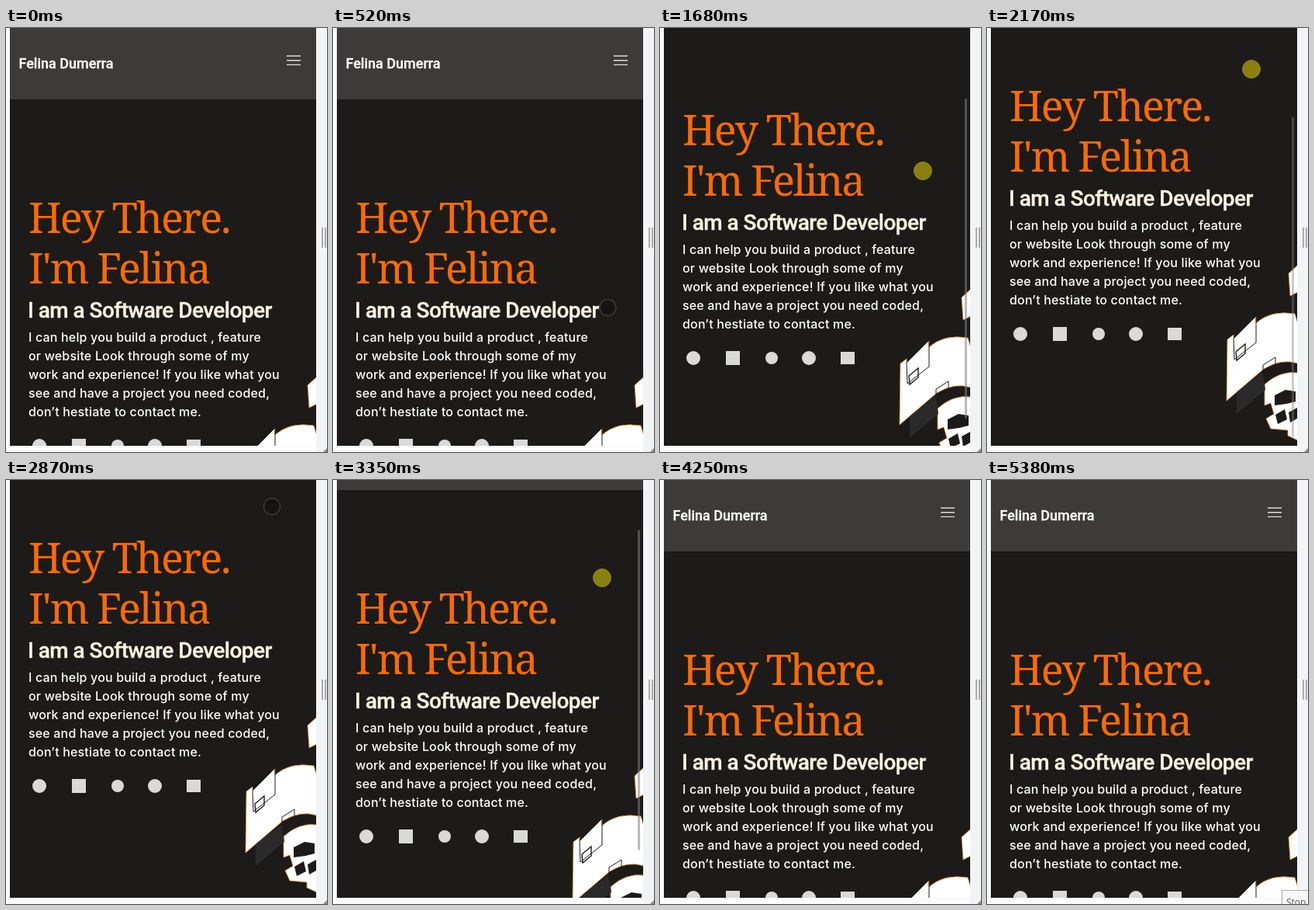
Recreate the animation shown at these times as an HTML page. Size 414x546 px, loop 5.45 s.

```html
<!DOCTYPE html>
<html lang="en">
<head>
<meta charset="utf-8">
<title>Portfolio scroll</title>
<style>
  html, body { margin: 0; width: 100%; height: 100%; overflow: hidden; background: #fbfcfd; }
  svg { display: block; width: 414px; height: 546px; }
  .brand, .role { font-family: Roboto, sans-serif; font-weight: 500; }
  .brand { font-size: 18px; fill: #fff; stroke: #fff; stroke-width: .3; }
  .role { font-size: 28px; letter-spacing: -.56px; fill: #fdf3e1; stroke: #fdf3e1; stroke-width: .4; }
  .title { font: 500 54px "Noto Serif", serif; letter-spacing: -2.1px; fill: #ff6a00; }
  .copy { font: 500 16px Inter, sans-serif; letter-spacing: .17px; fill: #fff; }
  .tip text { font: 12px "Open Sans", sans-serif; fill: #575757; }
</style>
</head>
<body>
<svg viewBox="0 0 414 546">
  <defs>
    <clipPath id="view"><rect x="5" width="395" height="538"/></clipPath>
  </defs>
  <rect x="400" width="14" height="546" fill="#f1f3f5"/>
  <path d="M408 257v26M412 257v26" stroke="#9a9a9a" stroke-width="1.6"/>
  <path d="M414 541v5h-5z" fill="#8c8c8c"/>

  <g clip-path="url(#view)">
    <rect x="5" width="395" height="538" fill="#1c1b19"/>
    <g id="page">
      <rect x="5" width="395" height="92" fill="#3c3b39"/>
      <text class="brand" x="16.5" y="52">Felina Dumerra</text>
      <path d="M362 36h18M362 41.7h18M362 47.4h18" stroke="#dcdcdc" stroke-width="1.4"/>
      <text class="title" x="29" y="264">Hey There.</text>
      <text class="title" x="29" y="329">I'm Felina</text>
      <text class="role" x="28" y="373">I am a Software Developer</text>
      <g id="copy" class="copy"></g>
      <g fill="#d9d9d9">
        <circle cx="43" cy="538" r="9"/>
        <rect x="85" y="529" width="18" height="18"/>
        <circle cx="144" cy="538" r="8"/>
        <circle cx="192" cy="538" r="9"/>
        <rect x="233" y="530" width="18" height="16"/>
      </g>
      <g transform="translate(0 113)">
        <g fill="#fff" stroke="#e8892c" stroke-width=".8">
          <path d="M389 347L401 336V371L391 376Z"/>
          <path d="M310 432L318 426V431L347 402V411Q366 394 397 399L401 412V463Q380 456 357 470L309 511Z"/>
          <path d="M358 490Q378 472 401 475V562L388 556V549L366 547L360 534L370 528L366 514L358 517Z"/>
        </g>
        <path d="M322 500L356 474L359 497L322 528Z" fill="#2a2a2b"/>
        <g fill="none" stroke="#1c1b19">
          <path d="M318 431L347 402V436L319 458Z"/>
          <path d="M321 448L333 438V450L322 459Z" stroke-width="1.4"/>
          <path d="M356 465L372 455V470L356 481Z"/>
        </g>
        <path d="M371 504L385 497L398 499V512L386 515L371 517ZM372 529L384 522L387 535L375 541ZM389 526L400 520V534L391 539Z" fill="#1c1b19"/>
      </g>
    </g>
    <rect id="bar" x="393" width="3" height="412" rx="1" fill="#808080" fill-opacity=".55"/>
    <circle id="dot"/>
  </g>

  <g id="tip" class="tip">
    <rect x="380.5" y="528.5" width="40" height="24" fill="#f7f7f7" stroke="#a9a9a9"/>
    <text x="386" y="548">Stop</text>
  </g>
</svg>
<script>
const LOOP = 5450, STEP = 70, MAX_SCROLL = 144;
const PHASES = [5150, 3830, 3210, 0]; // each restarts the step clock
const el = id => document.getElementById(id);
const clamp = (v, lo, hi) => Math.min(hi, Math.max(lo, v));
const within = (t, a, b) => t >= a && t < b;

const lines = [
  'I can help you build a product , feature',
  'or website Look through some of my',
  'work and experience! If you like what you',
  'see and have a project you need coded,',
  'don’t hestiate to contact me.'
];
el('copy').innerHTML = lines
  .map((s, i) => `<text x="29" y="${404 + 24 * i}">${s}</text>`).join('');

// pointer path: time, x, y
const path = [
  [70, 398, 520], [590, 344, 322], [800, 338, 310], [1470, 338, 310],
  [1540, 338, 288], [1610, 338, 238], [1680, 339, 184], [1820, 341, 105],
  [2030, 341, 53], [2590, 341, 53], [2870, 343, 34], [3140, 343, 34],
  [3210, 344, 58], [3350, 347, 126], [3490, 354, 250], [3690, 361, 343],
  [3830, 361, 343], [4250, 414, 520]
];

function pointer(t) {
  const i = path.findIndex(p => p[0] >= t);
  if (i < 1) return path[i < 0 ? path.length - 1 : 0].slice(1);
  const a = path[i - 1], b = path[i], k = (t - a[0]) / (b[0] - a[0]);
  return [a[1] + (b[1] - a[1]) * k, a[2] + (b[2] - a[2]) * k];
}

// the page follows the finger once it has passed the drag threshold
function scrollAt(t, y) {
  if (t < 1540 || t >= 3690) return 0;
  return t < 2660
    ? clamp(297 - y, 0, MAX_SCROLL)
    : clamp(MAX_SCROLL + 61 - y, 0, MAX_SCROLL);
}

function barOpacity(t) {
  if (within(t, 1540, 2450)) return clamp(1 - (t - 2100) / 280, 0, 1);
  if (within(t, 3210, 4250)) return clamp(1 - (t - 3830) / 280, 0, 1);
  return 0;
}

function set(node, attrs) {
  for (const k in attrs) node.setAttribute(k, attrs[k]);
}

function stepped(t) {
  const from = PHASES.find(p => t >= p);
  return from + Math.floor((t - from) / STEP) * STEP;
}

function render(now) {
  const t = stepped(now % LOOP);
  const [x, y] = pointer(t);
  const scroll = Math.round(scrollAt(t, y));
  const down = within(t, 1210, 2240) || within(t, 2940, 3830);

  set(el('page'), { transform: `translate(0 ${-scroll})` });
  set(el('bar'), { y: 3.5 + scroll * .772, opacity: barOpacity(t) });
  set(el('dot'), {
    cx: x, cy: y,
    r: down ? 11.5 : 10.5,
    fill: down ? '#89800f' : '#141414',
    stroke: down ? '#918819' : '#3b3b3a',
    'stroke-width': down ? 1 : 1.5,
    opacity: within(t, 70, 4250) ? 1 : 0
  });
  set(el('tip'), { opacity: clamp((t - 5080) / 280, 0, 1) });
}

const start = performance.now();
function tick() {
  render(Math.max(0, performance.now() - start));
  requestAnimationFrame(tick);
}
tick();
</script>
</body>
</html>
```
